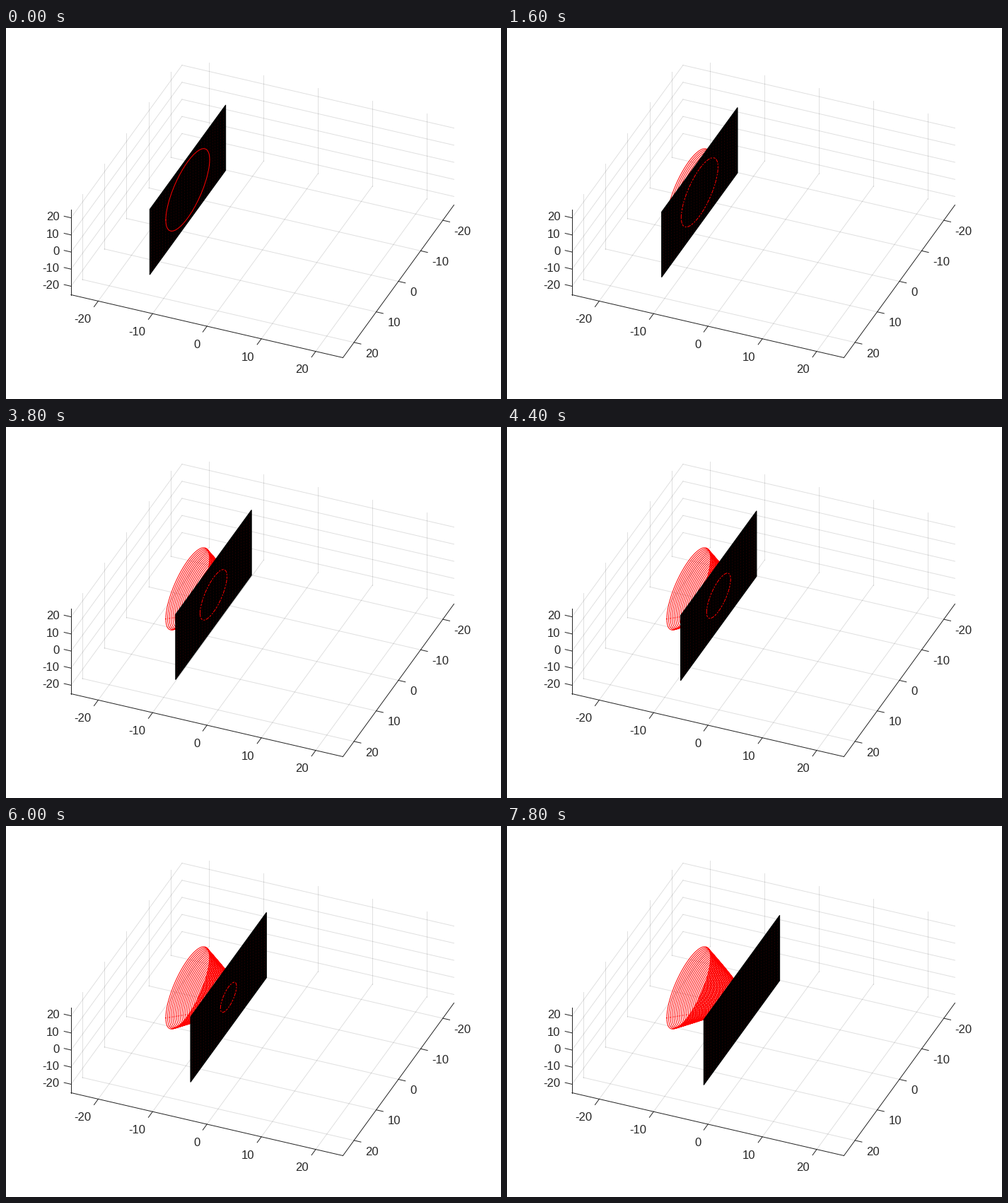
A matplotlib script that plays this animation: 700x525 px, repeating every 8000 ms.

```python
import numpy as np
import matplotlib.pyplot as plt
from matplotlib.animation import FuncAnimation
from matplotlib.patches import Polygon

W, H, DPI = 700, 525, 100
FRAMES, STEP_MS = 40, 200
PX = 72 / DPI                      # one pixel in points
INK = "#262626"
LIM = 25
TICKS = (-20, -10, 0, 10, 20)
X_START, X_STEP = -13.75, 0.25
HALF_Y, HALF_Z = 17.1, 19.1        # half size of the cutting sheet

ORIGIN = np.array([362.2, 253.0])
AXES = np.array([[7.69, 1.78], [-3.14, 4.32], [0.0, -2.42]])

plt.rcParams["font.family"] = "Liberation Sans"
fig = plt.figure(figsize=(W / DPI, H / DPI), dpi=DPI, facecolor="white")
ax = fig.add_axes([0, 0, 1, 1])
ax.set_xlim(-0.5, W - 0.5)
ax.set_ylim(H - 0.5, -0.5)
ax.axis("off")


def project(x, y, z):
    """Parallel projection of box coordinates to stage pixels."""
    pts = np.stack(np.broadcast_arrays(x, y, z), axis=-1).astype(float)
    return ORIGIN + pts @ AXES


def segment(a, b, **style):
    p = np.array([a, b])
    ax.plot(p[:, 0], p[:, 1], **style)


def label(pos, value, align):
    ax.text(pos[0], pos[1] + 5.8, str(value), size=16.67 * PX, color=INK,
            ha=align, va="baseline")


def draw_box():
    grid = dict(color=INK, alpha=0.15, lw=0.95 * PX, zorder=1)
    edge = dict(color=INK, lw=PX, zorder=2, solid_capstyle="projecting")
    lo, hi = -LIM, LIM
    for t in TICKS:
        segment(project(t, lo, lo), project(t, hi, lo), **grid)
        segment(project(t, lo, lo), project(t, lo, hi), **grid)
        segment(project(lo, t, lo), project(hi, t, lo), **grid)
        segment(project(lo, t, lo), project(lo, t, hi), **grid)
        segment(project(lo, lo, t), project(hi, lo, t), **grid)
        segment(project(lo, lo, t), project(lo, hi, t), **grid)
    segment(project(lo, hi, lo), project(hi, hi, lo), **edge)
    segment(project(hi, hi, lo), project(hi, lo, lo), **edge)
    segment(project(lo, hi, lo), project(lo, hi, hi), **edge)

    along_x, along_y = (v / np.hypot(*v) * 10 for v in AXES[:2])
    for t in TICKS:
        px, py, pz = project(t, hi, lo), project(hi, t, lo), project(lo, hi, t)
        segment(px, px + along_y, **edge)
        segment(py, py + along_x, **edge)
        segment(pz, pz - along_x, **edge)
        label(px + (-10, 25), t, "right")
        label(py + (16, 15), t, "left")
        label(pz + (-16.5, -2), t, "right")


def ring(n):
    """Cut through x^2/16 - y^2/9 - z^2/25 = 1 at step n."""
    x = X_START + X_STEP * n
    r = np.sqrt(max(x * x / 16 - 1, 0))
    a = np.linspace(0, 2 * np.pi, 121)
    return project(x, 3 * r * np.cos(a), 5 * r * np.sin(a))


def chain(parts):
    """Join separate curves into one, parted by gaps."""
    gap = np.full((1, 2), np.nan)
    return np.vstack([p for part in parts for p in (part, gap)] or [gap])


draw_box()
rings = [ring(n) for n in range(FRAMES)]

ys = np.array([-HALF_Y, HALF_Y, HALF_Y, -HALF_Y])
zs = np.array([-HALF_Z, -HALF_Z, HALF_Z, HALF_Z])
ends = np.array([-HALF_Z + 1, HALF_Z - 1])
stripe_ys = np.arange(-16, 17, 1.25)

past, = ax.plot([], [], color="red", lw=PX, zorder=3)
sheet = ax.add_patch(Polygon(project(X_START, ys, zs), facecolor="black",
                             edgecolor="black", lw=PX, joinstyle="miter",
                             zorder=4))
stripes, = ax.plot([], [], color="#240000", lw=0.8 * PX, zorder=5,
                   linestyle=(0, (3, 2)))
cut, = ax.plot([], [], color="red", lw=PX, zorder=6, dash_capstyle="butt")


def update(n):
    x = X_START + X_STEP * n
    sheet.set_xy(project(x, ys, zs))
    stripes.set_data(*chain([project(x, y, ends) for y in stripe_ys]).T)
    past.set_data(*chain(rings[:n]).T)
    # the newest cut lies in the sheet, so it shows only in broken pieces
    cut.set_linestyle("-" if n == 0 else (0, (5, 1.5, 2, 2, 3, 1.5)))
    cut.set_visible(n < FRAMES - 1)
    cut.set_data(*rings[n].T)
    return past, sheet, stripes, cut


anim = FuncAnimation(fig, update, frames=FRAMES, interval=STEP_MS,
                     init_func=lambda: update(0), repeat=True, repeat_delay=0)
plt.show()
```
